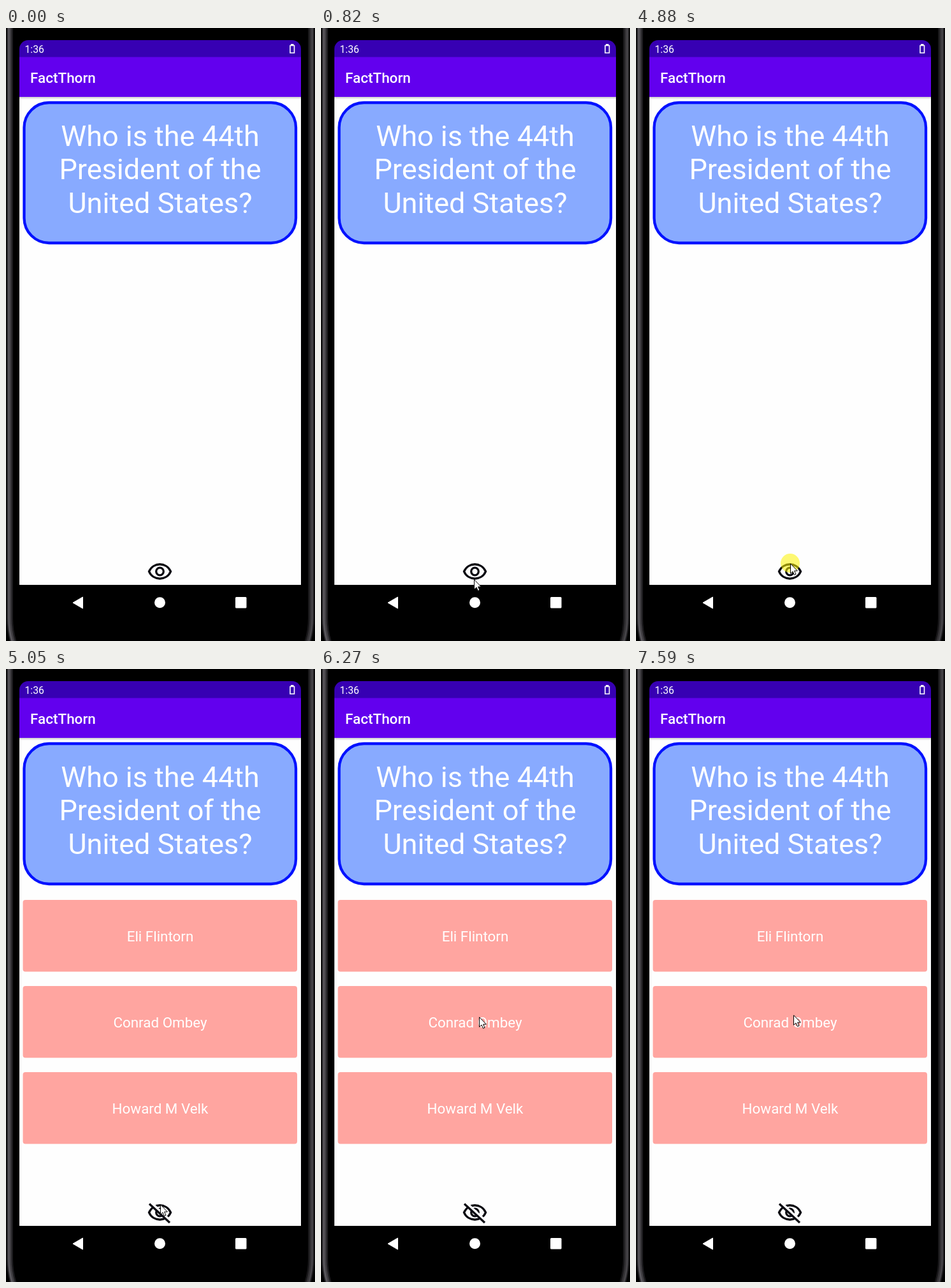
An HTML page that plays this animation: 485x961 px, repeating every 8000 ms.

```html
<!DOCTYPE html>
<html lang="en">
<head>
<meta charset="utf-8">
<title>FactThorn</title>
<style>
  html, body { margin: 0; width: 100%; height: 100%; overflow: hidden; background: #000; }
  svg { display: block; width: 485px; height: 961px; }
  text { font-family: Roboto, Arial, sans-serif; fill: #fff; }
  .question { font-size: 45px; text-anchor: middle; }
  .answer { font-size: 22.4px; text-anchor: middle; }
  .eye { fill: none; stroke: #0b0b12; stroke-width: 3.3; }
  #answers, #shut, #press, #cursor { opacity: 0; }
</style>
</head>
<body>
<svg viewBox="0 0 485 961">
  <defs>
    <linearGradient id="shade" x2="0" y2="1">
      <stop offset="0" stop-color="#000" stop-opacity=".2"/>
      <stop offset="1" stop-color="#000" stop-opacity="0"/>
    </linearGradient>
    <path id="edge" d="M6 -5V925Q6 950 15 972"/>
    <g id="bezel" fill="none">
      <use href="#edge" stroke="#1d1c1f" stroke-width="10"/>
      <use href="#edge" x="-.5" stroke="#403e42" stroke-width="6"/>
      <use href="#edge" x="-1.5" stroke="#59575c" stroke-width="2.5"/>
    </g>
    <g id="eyeShape">
      <path d="M224.5 852C231 837 252 837 258.5 852C252 867 231 867 224.5 852Z"/>
      <circle cx="241.5" cy="852" r="5.8"/>
    </g>
  </defs>

  <rect width="485" height="961"/>
  <use href="#bezel"/>
  <use href="#bezel" transform="translate(485 0) scale(-1 1)" opacity=".8"/>

  <rect x="21" y="108" width="442" height="765" fill="#fefefe"/>
  <rect x="21" y="108" width="442" height="4" fill="url(#shade)"/>
  <path d="M21 46V33A14 14 0 0 1 35 19H449A14 14 0 0 1 463 33V46Z" fill="#3700b3"/>
  <rect x="21" y="45.5" width="442" height="62.5" fill="#6200ee"/>
  <text x="29.5" y="38.5" font-size="15.75">1:36</text>
  <path d="M446 27.5H452.5V39H446Z" fill="none" stroke="#fff" stroke-width="1.6"/>
  <rect x="447" y="25" width="4.500" height="2.5" fill="#fff"/>
  <text x="38" y="86" font-size="22.5" font-weight="500">FactThorn</text>

  <rect x="28.5" y="117" width="426.5" height="220" rx="39" fill="#88aaff" stroke="#0011ff" stroke-width="4.3"/>
  <g id="question"></g>
  <g id="answers"></g>

  <use id="open" class="eye" href="#eyeShape"/>
  <g id="shut" class="eye">
    <use href="#eyeShape"/>
    <path d="M228 837L260 867" stroke="#fefefe" stroke-width="4"/>
    <path d="M225 838.5L257 868"/>
  </g>

  <g fill="#fff">
    <path d="M105 901L120.5 892V910Z" stroke="#fff" stroke-linejoin="round"/>
    <circle cx="241.5" cy="900.8" r="8.5"/>
    <rect x="360" y="892" width="17.5" height="17.5" rx="1.5"/>
  </g>

  <circle id="press" cx="242" cy="839" r="15" fill="#fdf400"/>
  <path id="cursor" d="M.5 .8V16.2L4 12.9L6.5 18.4L9 17.3L6.6 12H11.4Z" fill="#fff" stroke="#000"/>
</svg>
<script>
const LOOP = 8000, ENTER = 520, CLICK = 4880, REVEAL = 5050, TICK = 75;
const $ = id => document.getElementById(id);
const label = (kind, y, words) => `<text class="${kind}" x="242" y="${y}">${words}</text>`;

$('question').innerHTML = ['Who is the 44th', 'President of the', 'United States?']
  .map((line, i) => label('question', 184.6 + i * 52.7, line)).join('');

$('answers').innerHTML = ['Eli Flintorn', 'Conrad Ombey', 'Howard M Velk'].map((name, i) => {
  const y = 362 + i * 135;
  return `<rect x="26.5" y="${y}" width="430.5" height="112.5" rx="4" fill="#ffa5a0"/>`
    + label('answer', y + 65, name);
}).join('');

// Each step holds its value until the next one.
function play(id, steps) {
  const frames = steps.map(([time, style]) => ({ offset: time / LOOP, easing: 'step-end', ...style }));
  frames.push({ ...frames[frames.length - 1], offset: 1 });
  $(id).animate(frames, { duration: LOOP, iterations: Infinity }).startTime = 0;
}
const fade = (id, ...steps) => play(id, steps.map(([t, opacity]) => [t, { opacity }]));

fade('answers', [0, 0], [REVEAL, 1]);
fade('shut', [0, 0], [REVEAL, 1]);
fade('open', [0, 1], [REVEAL, 0]);
fade('press', [0, 0], [CLICK, 0.55], [REVEAL, 0]);
fade('cursor', [0, 0], [ENTER, 1]);

// The pointer glides to each stop, slowing down, redrawn about once per tick.
const ease = u => 1 - (1 - u) ** 1.7;
const at = (x, y) => ({ transform: `translate(${Math.round(x)}px, ${Math.round(y)}px)` });

function glide([x, y], moves) {
  const steps = [[0, at(x, y)]];
  for (const { from, until, to: [tx, ty] } of moves) {
    const count = Math.round((until - from) / TICK) + 1;
    const gap = (until - from) / Math.max(1, count - 1);
    for (let i = 0; i < count; i++) {
      const k = ease((i + 1) / count);
      const time = Math.round((from + i * gap) / 10) * 10;
      steps.push([time, at(x + (tx - x) * k, y + (ty - y) * k)]);
    }
    [x, y] = [tx, ty];
  }
  return steps;
}

play('cursor', glide([208, 972], [
  { from: ENTER, until: 900, to: [242, 859] },
  { from: 1070, until: 1220, to: [242, 837] },
  { from: 1540, until: 1540, to: [242, 839] },
  { from: 5600, until: 5810, to: [217, 479] },
  { from: 5980, until: 6040, to: [214, 424] },
  { from: 6210, until: 6270, to: [248, 545] },
  { from: 7290, until: 7370, to: [242, 495] },
  { from: 7520, until: 7590, to: [247, 542] }
]));
</script>
</body>
</html>
```
